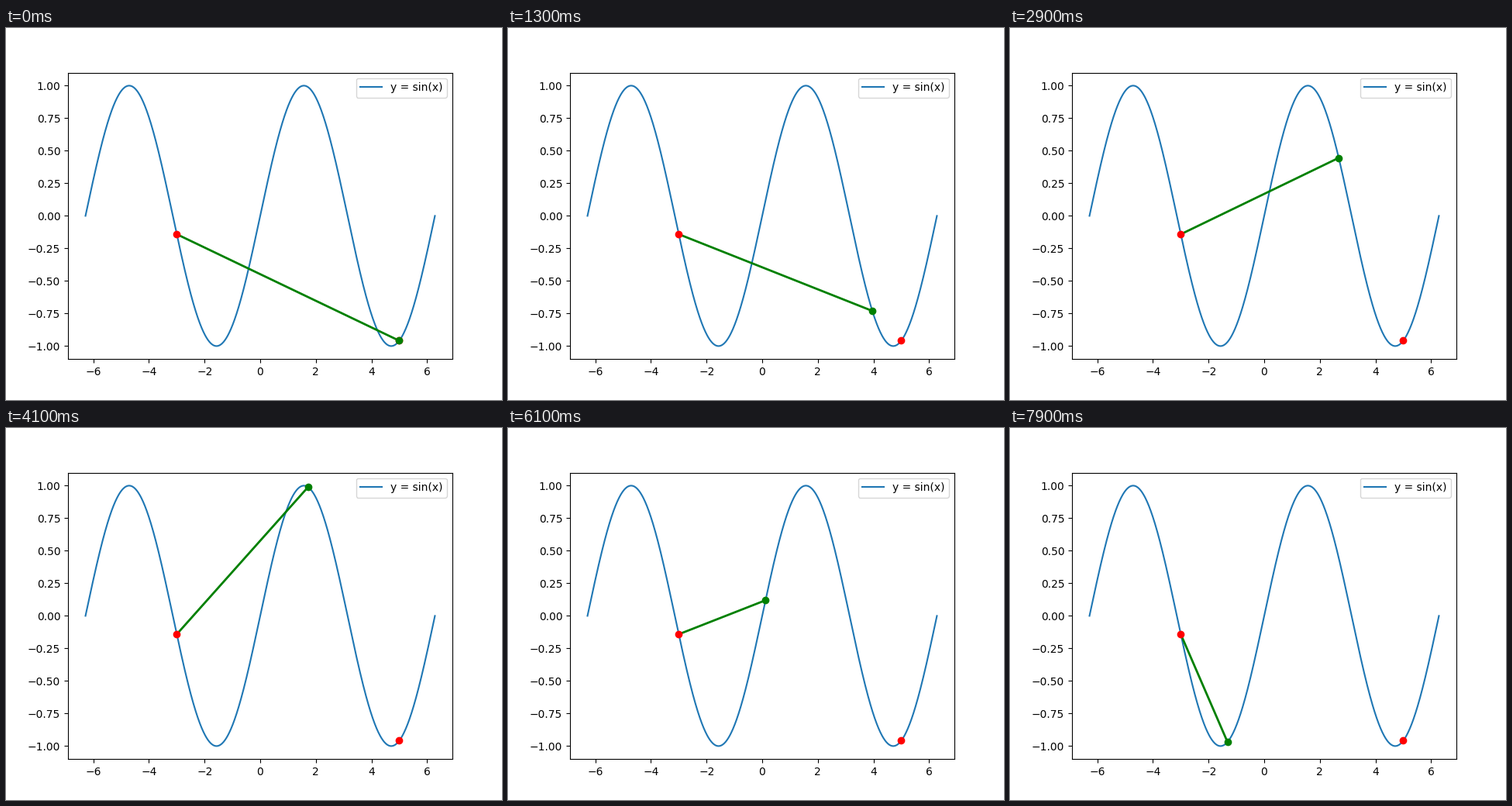
A matplotlib script that plays this animation: 640x480 px, repeating every 8000 ms.

```python
import numpy as np
import matplotlib.pyplot as plt
from matplotlib.animation import FuncAnimation

FRAMES = 80
INTERVAL = 100
STEP = 0.08
ANCHOR, START = -3.0, 5.0

fig, ax = plt.subplots(figsize=(6.4, 4.8), dpi=100)

x = np.linspace(-2 * np.pi, 2 * np.pi, 1000)
ax.plot(x, np.sin(x), label="y = sin(x)")
chord, = ax.plot([], [], "g-", lw=2)
for px in (ANCHOR, START):
    ax.plot(px, np.sin(px), "ro")
dot, = ax.plot([], [], "go")

ax.set_xlim(-2.2 * np.pi, 2.2 * np.pi)
ax.set_ylim(-1.1, 1.1)
ax.legend(loc="upper right")


def update(i):
    """Slide the free end of the chord along the curve."""
    px = START - STEP * i
    py = np.sin(px)
    chord.set_data([ANCHOR, px], [np.sin(ANCHOR), py])
    dot.set_data([px], [py])
    return chord, dot


anim = FuncAnimation(fig, update, frames=FRAMES, interval=INTERVAL,
                     repeat=True, repeat_delay=0, blit=False)
plt.show()
```
